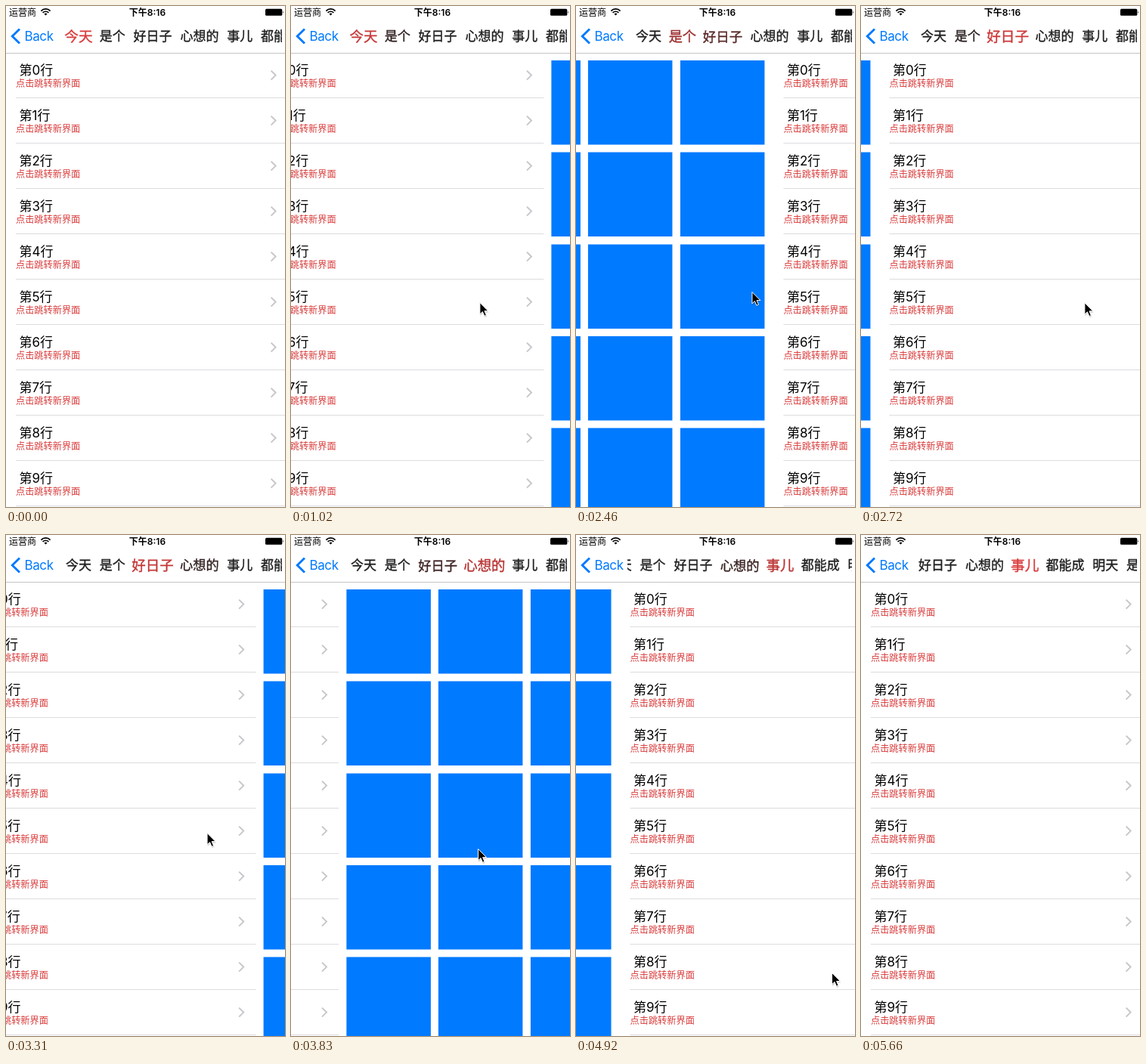
Animation of 369x663 px, one loop 6010 ms. Source, as an HTML page:

```html
<!DOCTYPE html>
<html lang="zh-CN">
<head>
<meta charset="utf-8">
<title>Tab pager</title>
<style>
  html, body { margin: 0; width: 100%; height: 100%; overflow: hidden; background: #fff; }
  svg { display: block; width: 369px; height: 663px; font-family: Inter, "Noto Sans CJK SC", "Noto Sans CJK", sans-serif; }
  .title { font-size: 17px; }
  .subtitle { font-size: 12.2px; fill: #d93b3b; }
  .tab { font-size: 17px; text-anchor: middle; stroke-width: .35px; }
  .status { font-size: 12px; }
</style>
</head>
<body>
<svg viewBox="0 0 369 663" xmlns="http://www.w3.org/2000/svg">
  <defs>
    <clipPath id="bar"><rect x="68" y="22" width="297" height="40"/></clipPath>
    <clipPath id="body"><rect y="62" width="369" height="601"/></clipPath>
  </defs>
  <rect width="369" height="663" fill="#fff"/>
  <g id="pages" clip-path="url(#body)"></g>
  <path d="M0 62.5H369" stroke="#c4c4c6"/>
  <g class="status">
    <text x="4" y="12.6">运营商</text>
    <text x="187" y="12.6" text-anchor="middle" font-weight="600">下午8:16</text>
  </g>
  <g fill="none" stroke="#000" stroke-width="1.7">
    <path d="M46.4 6.6A8.4 8.4 0 0 1 58.6 6.6M48.6 8.9A5.4 5.4 0 0 1 56.4 8.9"/>
    <path d="M52.5 12.6L50.5 10.4A2.9 2.9 0 0 1 54.5 10.4Z" fill="#000" stroke="none"/>
  </g>
  <rect x="343" y="3.8" width="22.3" height="9" rx="1.6"/>
  <path d="M366 6.7q1.6 1.6 0 3.2z"/>
  <path d="M18 30.5L8.3 40L18 49.5" fill="none" stroke="#007aff" stroke-width="2.9"/>
  <text x="24.5" y="46" font-size="17" letter-spacing="-.4" fill="#007aff">Back</text>
  <g clip-path="url(#bar)"><g id="tabs"></g></g>
  <g id="cursor">
    <path d="M1 2V18L4.6 14.6L7 20L9.8 18.8L7.5 13.6H12.4Z" opacity=".18"/>
    <path d="M.5 .5V15.8L4 12.5L6.5 18.3L9 17.2L6.6 11.6H11.5Z" stroke="#fff"/>
  </g>
</svg>
<script>
const LOOP = 6010, PAGE = 375, LEFT = -2, TOP = 62, ROW = 60;
const DARK = [30, 30, 30], RED = [217, 59, 59];
const TAB_GAP = 10.8, BAR_CENTER = 216.7, TAB_SLIDE = 270;
const SLOP = 10, GLIDE = 270;
const $ = id => document.getElementById(id);
const clamp = v => Math.min(1, Math.max(0, v));
const mix = (a, b, u) => a + (b - a) * u;
const easeInOut = u => u * u * (3 - 2 * u);
const easeOut = u => 1 - (1 - u) ** 3;

function add(parent, tag, attrs, text) {
  const node = document.createElementNS("http://www.w3.org/2000/svg", tag);
  for (const key in attrs) node.setAttribute(key, attrs[key]);
  if (text) node.textContent = text;
  return parent.appendChild(node);
}

function buildList(page) {
  for (let i = 0; i < 10; i++) {
    const row = add(page, "g", { transform: `translate(0 ${TOP + i * ROW})` });
    add(row, "text", { class: "title", x: 19.5, y: 29.4 }, `第${i}行`);
    add(row, "text", { class: "subtitle", x: 15, y: 45.3 }, "点击跳转新界面");
    add(row, "path", { d: "M15 59.5H375", stroke: "#dcdce0" });
    add(row, "path", { d: "M352.6 23.6L358.6 29.6L352.6 35.6", fill: "none", stroke: "#c7c7cc", "stroke-width": 2 });
  }
}

function buildGrid(page) {
  const gap = 10, pitch = (PAGE - gap) / 3;
  const snap = v => Math.round(v * 2) / 2;
  for (let i = 0; i < 15; i++) {
    add(page, "rect", {
      x: snap(gap + (i % 3) * pitch),
      y: snap(TOP + gap + Math.floor(i / 3) * pitch),
      width: snap(pitch - gap), height: snap(pitch - gap), fill: "#007aff"
    });
  }
}

const pages = Array.from({ length: 5 }, (_, i) => {
  const page = add($("pages"), "g", {});
  (i % 2 ? buildGrid : buildList)(page);
  return page;
});

let tabX = 79;
const tabs = ["今天", "是个", "好日子", "心想的", "事儿", "都能成", "明天", "是"].map(label => {
  const width = label.length * 17, center = tabX + width / 2;
  tabX += width + TAB_GAP;
  return { center, node: add($("tabs"), "text", { class: "tab", y: 6.4 }, label) };
});

// Each swipe turns one page; the finger may rest at `hold` for `rest` ms. Higher drag = slower start.
const swipes = [
  { start: 850, release: 1470, end: 1870, drag: .353, x: 298, y: 392 },
  { start: 2115, release: 2580, end: 2835, drag: 1.97, x: 356, y: 378 },
  { start: 3110, release: 3570, end: 4100, drag: .854, x: 318, y: 394, hold: 3390, rest: 180 },
  { start: 4130, release: 4740, end: 5360, drag: .432, x: 247, y: 415, hold: 4500, rest: 120 }
];
const entry = { start: 410, end: 530, dx: 50 };
const exit = { start: 5380, speed: .3, x: 350, y: 585 };

function progress({ start, end, drag, hold = end, rest = 0 }, t) {
  const moving = t - start - Math.min(rest, Math.max(0, t - hold));
  const u = clamp(moving / (end - start - rest));
  return u * u / (u * u + drag * (1 - u) ** 2);
}

function tabShift(t) {
  return swipes.reduce((shift, { end }, i) => {
    const centered = Math.max(0, tabs[i + 1].center - BAR_CENTER);
    return mix(shift, centered, easeInOut(clamp((t - end + TAB_SLIDE) / TAB_SLIDE)));
  }, 0);
}

// The pointer follows the page while dragging, then glides to the next grab point.
function cursorAt(t) {
  const i = Math.max(0, swipes.findLastIndex(swipe => t >= swipe.start));
  const swipe = swipes[i], next = swipes[i + 1] || exit;
  const travel = PAGE * progress(swipe, Math.min(t, swipe.release));
  const back = easeOut(clamp((t - swipe.release) / GLIDE));
  const entering = 1 - clamp((t - entry.start) / (entry.end - entry.start));
  return {
    x: mix(swipe.x - travel - Math.min(SLOP, travel), next.x, back) + entry.dx * entering,
    y: mix(swipe.y, next.y, back) + Math.max(0, t - exit.start) * exit.speed
  };
}

function render(t) {
  const turned = swipes.reduce((sum, swipe) => sum + progress(swipe, t), 0);
  const shift = tabShift(t), cursor = cursorAt(t);

  pages.forEach((page, i) => {
    page.setAttribute("transform", `translate(${LEFT + (i - turned) * PAGE} 0)`);
  });

  tabs.forEach(({ center, node }, i) => {
    const active = clamp(1 - Math.abs(turned - i));
    const color = `rgb(${DARK.map((c, k) => Math.round(mix(c, RED[k], active)))})`;
    node.setAttribute("transform", `translate(${center - shift} 40) scale(${1 + .1 * active})`);
    node.setAttribute("fill", color);
    node.setAttribute("stroke", color);
  });

  $("cursor").setAttribute("visibility", t >= entry.start ? "visible" : "hidden");
  $("cursor").setAttribute("transform", `translate(${cursor.x} ${cursor.y})`);
}

const startTime = performance.now();
function tick() {
  render((performance.now() - startTime) % LOOP);
  requestAnimationFrame(tick);
}
tick();
</script>
</body>
</html>
```
